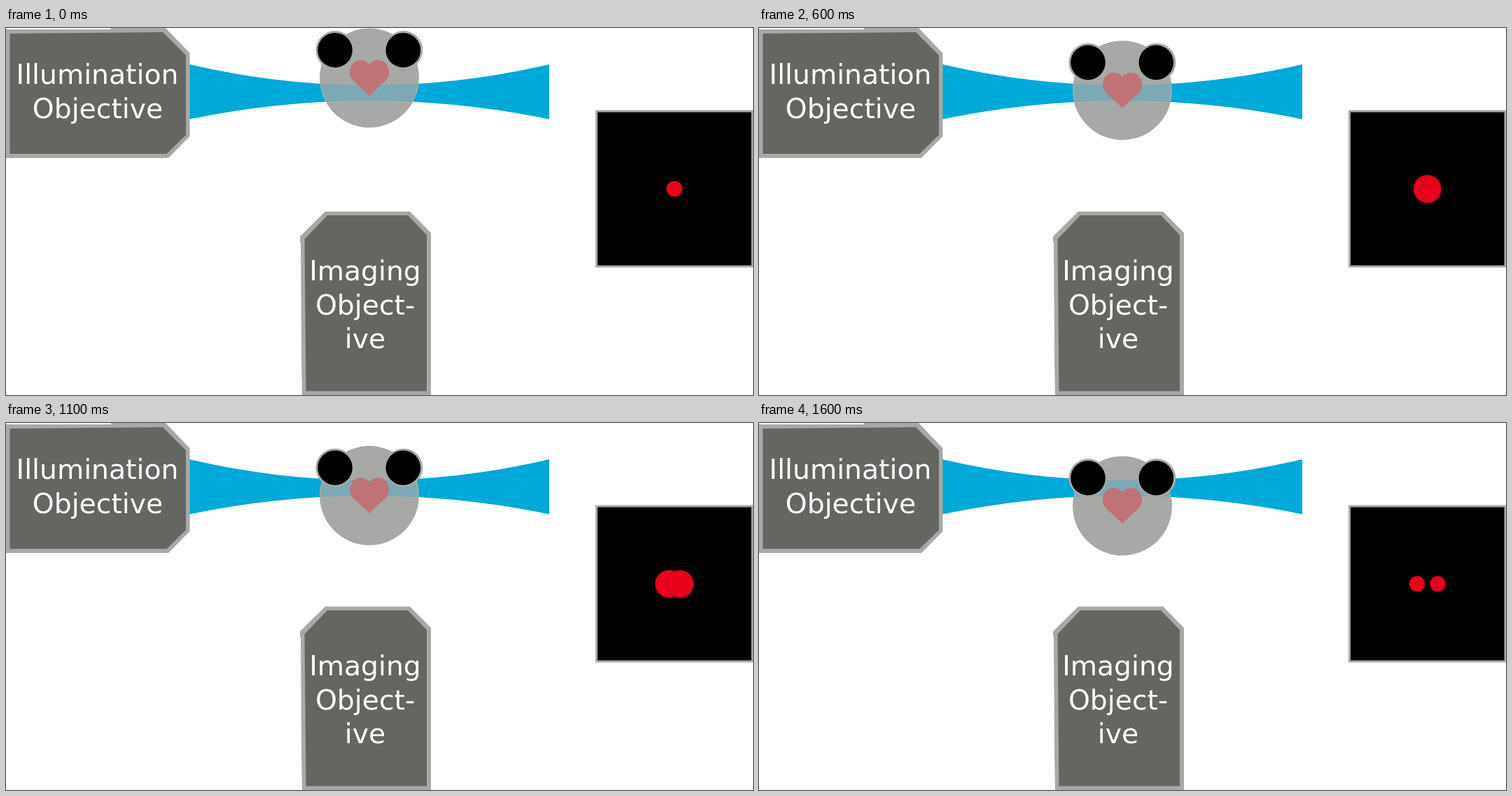
Write an HTML page that moves like this. It is 1067 px wide and 525 px high and loops after 2.1 s.

```html
<!DOCTYPE html>
<html lang="en">
<head>
<meta charset="utf-8">
<title>Light sheet scan</title>
<style>
  html, body { margin: 0; width: 100%; height: 100%; overflow: hidden; background: #fff; }
  svg { display: block; width: 100%; height: 100%; }
  text { font: 39.3px "DejaVu Sans", sans-serif; fill: #fff; text-anchor: middle; }
  .rim { fill: #a7a9a6; }
  .core { fill: #646661; }
</style>
</head>
<body>
<svg viewBox="0 0 1067 525" xmlns="http://www.w3.org/2000/svg">
  <defs>
    <path id="beam" d="M262 52Q519.5 112 776 52V130.5Q519.5 77.5 262 130.5Z"/>
    <clipPath id="inside"><circle id="window" cx="519" cy="71.5" r="69"/></clipPath>
  </defs>

  <use href="#beam" fill="#00a9d8"/>

  <g class="fish"><circle class="rim" cx="519" cy="71.5" r="71"/></g>
  <g clip-path="url(#inside)"><use href="#beam" fill="#7da8b5"/></g>
  <g class="fish">
    <circle class="rim" cx="470" cy="31.7" r="27.6"/>
    <circle class="rim" cx="567.8" cy="31.7" r="27.6"/>
    <circle cx="470" cy="31.7" r="24.8"/>
    <circle cx="567.3" cy="31.7" r="24.8"/>
    <path fill="#bf7377" d="M519 97C518 96 509 87 500 79C494 74 491 70 491 63C491 53 498 46 506.5 46C512 46 516.5 48.5 519 52.5C521.5 48.5 526 46 531.5 46C540 46 547 53 547 63C547 70 544 74 538 79C529 87 520 96 519 97Z"/>
  </g>

  <path class="rim" d="M0 2L150 2V0H228L262.5 36V155L232 186H0Z"/>
  <path class="core" d="M5.5 8L224 6L257 39V153L229.5 180H5.5Z"/>
  <text x="130.5" y="79.5">Illumination</text>
  <text x="131" y="128.5">Objective</text>

  <path class="rim" d="M456 262.5H577L607 293V525H423L422 472L421 306H420V298Z"/>
  <path class="core" d="M459 268H574L601 296V519.5H428.5L426.5 302Z"/>
  <text x="513" y="360.5">Imaging</text>
  <text x="513" y="409.5">Object-</text>
  <text x="513" y="458">ive</text>

  <rect class="rim" x="842" y="117.5" width="225" height="225"/>
  <rect x="845" y="120.5" width="219.5" height="219"/>
  <g fill="#e6001a">
    <circle class="spot" cy="230.2"/>
    <circle class="spot" cy="230.2"/>
  </g>
</svg>
<script>
  const LOOP = 2100, STEP = 100, LAST = 16;
  const fish = document.querySelectorAll('.fish');
  const spots = document.querySelectorAll('.spot');
  const win = document.getElementById('window');

  // [step, value] keys, joined by straight lines
  const radius = [[0, 11.2], [4, 16.4], [6, 19.7], [9, 26.2], [11, 19.7], [14, 14.7], [16, 11.1]];
  const spread = [[0, 0], [9, 0], [11, 7.8], [14, 12.1], [16, 14.7]];

  function at(keys, s) {
    let i = 1;
    while (i < keys.length - 1 && s > keys[i][0]) i++;
    const [a, u] = keys[i - 1], [b, v] = keys[i];
    return u + (v - u) * (s - a) / (b - a);
  }

  function draw(ms) {
    const s = Math.min(LAST, Math.floor((ms % LOOP) / STEP));
    const dy = s * 47 / LAST;
    fish.forEach(g => g.setAttribute('transform', `translate(0 ${dy})`));
    win.setAttribute('cy', 71.5 + dy);
    spots.forEach((c, i) => {
      c.setAttribute('r', at(radius, s));
      c.setAttribute('cx', 954.7 + (i ? 1 : -1) * at(spread, s));
    });
  }

  let start;
  function tick(now) {
    start ??= now;
    draw(now - start);
    requestAnimationFrame(tick);
  }
  draw(0);
  requestAnimationFrame(tick);
</script>
</body>
</html>
```
